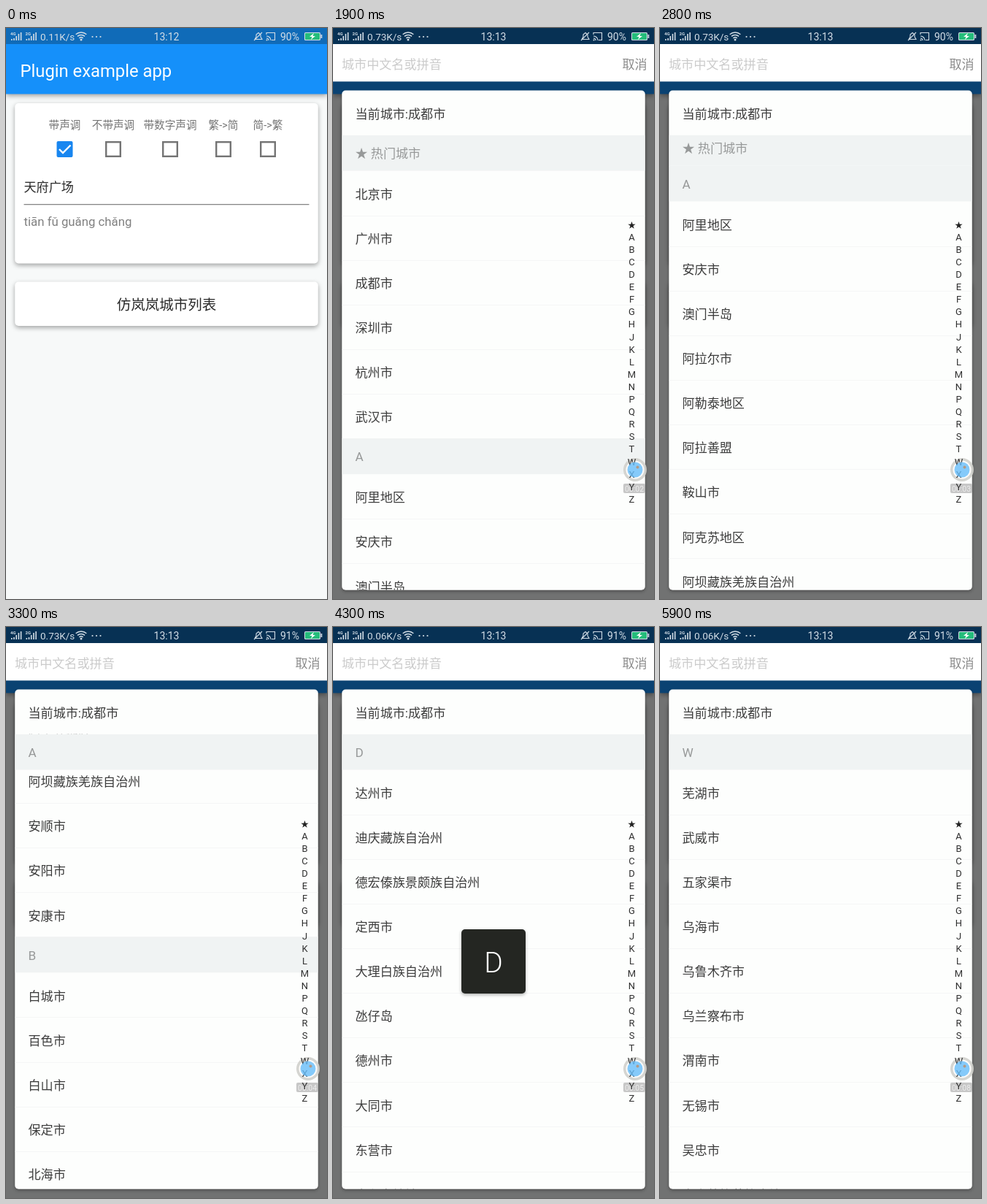
These frames come from a looping animation (440x782 px, 6 s). An HTML page with a canvas:

```html
<!DOCTYPE html>
<html lang="zh-CN">
<head>
<meta charset="utf-8">
<title>城市列表</title>
<style>
html, body { margin: 0; width: 100%; height: 100%; overflow: hidden; }
canvas { display: block; }
</style>
</head>
<body>
<canvas id="stage" width="440" height="782"></canvas>
<script>
const ctx = document.getElementById('stage').getContext('2d');
const LOOP = 6000, STEP = 100, PICKER_OPENS = 1700;
const DP = 440 / 360, ROW = 50 * DP, HEAD = 40 * DP;
const LEFT = 10 * DP, WIDTH = 340 * DP;
const SHEET_TOP = 70 * DP, LIST_TOP = 120 * DP, LIST_END = 782 - LEFT;
const PAPER = '#fdfefd';
const LETTERS = [...'ABCDEFGHJKLMNPQRSTWXYZ'];

const cities = {
  '★ 热门城市': '北京 广州 成都 深圳 杭州 武汉',
  A: '阿里地区 安庆 澳门半岛 阿拉尔 阿勒泰地区 阿拉善盟 鞍山 阿克苏地区 阿坝藏族羌族自治州 安顺 安阳 安康',
  B: '白城 百色 白山 保定 北海 白银 巴音郭楞蒙古自治州 本溪 北京 亳州 滨州 宝鸡 包头 蚌埠 毕节',
  C: '成都 长沙 重庆 长春 常州 沧州 承德 赤峰 潮州 滁州 郴州',
  D: '达州 迪庆藏族自治州 德宏傣族景颇族自治州 定西 大理白族自治州 氹仔岛 德州 大同 东营 大兴安岭地区 大连',
  E: '鄂尔多斯 鄂州 恩施土家族苗族自治州',
  F: '福州 佛山 抚顺 阜阳 防城港 阜新 抚州',
  G: '广州 贵阳 桂林 赣州 广元 贵港 广安 固原 甘南藏族自治州',
  H: '杭州 合肥 海口 哈尔滨 邯郸 惠州 湖州 淮安 黄山 衡阳 鹤岗',
  J: '济南 嘉兴 金华 九江 吉林 江门 荆州 济宁 焦作 锦州 晋城',
  K: '昆明 开封 克拉玛依 喀什地区',
  L: '兰州 洛阳 柳州 拉萨 丽江 临沂 廊坊 泸州 乐山 六安 聊城',
  M: '绵阳 马鞍山 茂名 梅州 牡丹江 眉山',
  N: '南京 宁波 南昌 南宁 南通 南充 南阳 内江 宁德 南平',
  P: '莆田 平顶山 萍乡 攀枝花 濮阳 盘锦 普洱 平凉',
  Q: '齐齐哈尔 清远 钦州 青岛 秦皇岛 潜江 黔西南布依族苗族自治州 黔东南苗族侗族自治州 黔南布依族苗族自治州 曲靖 泉州',
  R: '日照 日喀则 汝州',
  S: '上海 深圳 苏州 沈阳 石家庄 汕头 绍兴 三亚 韶关 十堰 商丘',
  T: '天津 太原 唐山 台州 泰安 通化 铜陵 铁岭 天水 铜川 通辽',
  W: '芜湖 武威 五家渠 乌海 乌鲁木齐 乌兰察布 渭南 无锡 吴忠 文山壮族苗族自治州 武汉',
  X: '西安 厦门 徐州 西宁 襄阳 新乡 邢台 许昌 咸阳 湘潭',
  Y: '扬州 银川 宜昌 烟台 盐城 岳阳 宜宾 玉林 延安 运城',
  Z: '郑州 珠海 中山 镇江 株洲 湛江 淄博 舟山 肇庆 遵义 张家口'
};
const cityName = s => /(自治州|地区|盟|半岛|仔岛)$/.test(s) ? s : s + '市';
let nextTop = 0;
const sections = Object.entries(cities).map(([title, names]) => {
  const section = { title, top: nextTop, names: names.split(' ').map(cityName) };
  nextTop += HEAD + section.names.length * ROW;
  return section;
});
const sectionTop = title => sections.find(s => s.title === title).top;

const modes = [
  ['带声调', 80.5, 'tiān fǔ guǎng chǎng', 0],
  ['不带声调', 147, 'tian fu guang chang', 200],
  ['带数字声调', 225, 'tian1 fu3 guang3 chang3', 500],
  ['繁->简', 298, '天府广场', 900],
  ['简->繁', 359, '天府廣場', 1300]
];

// Last value whose start time has passed; pairs are [start, value].
const at = (t, pairs) => pairs.filter(p => p[0] <= t).pop()[1];

function text(str, x, y, size, color, align = 'left', weight = 400) {
  ctx.font = `${weight} ${size}px Roboto, "Noto Sans CJK SC", "Noto Sans CJK", sans-serif`;
  ctx.textAlign = align;
  ctx.fillStyle = color;
  ctx.fillText(str, x, y + size * 0.365);
}
function rect(x, y, w, h, color) {
  ctx.fillStyle = color;
  ctx.fillRect(x, y, w, h);
}
function box(x, y, w, h, r, color) {
  ctx.beginPath();
  ctx.roundRect(x, y, w, h, r);
  ctx.fillStyle = color;
  ctx.fill();
}
function disc(x, y, r, color) {
  ctx.beginPath();
  ctx.arc(x, y, r, 0, 7);
  ctx.fillStyle = color;
  ctx.fill();
}
function line(points, color, width) {
  ctx.beginPath();
  points.forEach(p => ctx.lineTo(...p));
  ctx.strokeStyle = color;
  ctx.lineWidth = width;
  ctx.stroke();
}
function arc(x, y, r, from, to, color, width) {
  ctx.beginPath();
  ctx.arc(x, y, r, from, to);
  ctx.strokeStyle = color;
  ctx.lineWidth = width;
  ctx.stroke();
}
function shadowed(blur, dy, alpha, draw) {
  ctx.save();
  ctx.shadowColor = `rgba(0,0,0,${alpha})`;
  ctx.shadowBlur = blur;
  ctx.shadowOffsetY = dy;
  draw();
  ctx.restore();
}

function drawStatus(t) {
  const c = '#d3dde6';
  ['4G', '2G'].forEach((label, i) => {
    const x = 6 + i * 20.5;
    text(label, x, 7.5, 6, c, 'left', 700);
    [2, 3, 6, 9, 11].forEach((h, k) => rect(x + 1 + k * 3.2, 17 - h, 1.6, h, c));
  });
  text(at(t, [[0, '0.11K/s'], [900, '0.73K/s'], [4100, '0.06K/s']]), 47, 12, 13.5, c);
  [4, 7.5, 11].forEach(r => arc(103, 17, r, -2.3, -0.84, c, 1.5));
  disc(103, 16, 1.5, c);
  [118.5, 124, 129.5].forEach(x => disc(x, 12, 1.1, c));
  text(at(t, [[0, '13:12'], [900, '13:13']]), 220, 12, 14, c, 'center');
  line([[341, 15.5], [343, 12], [343, 9], [346, 6.5], [349, 9], [349, 12], [351, 15.5], [341, 15.5]], c, 1.1);
  line([[340, 17], [351, 6]], c, 1.1);
  line([[357, 9], [357, 6.5], [368.5, 6.5], [368.5, 16.5], [364, 16.5]], c, 1.1);
  [3, 6].forEach(r => arc(357, 17, r, -1.57, 0, c, 1.1));
  disc(357.5, 16.5, 1, c);
  text(at(t, [[0, '90%'], [3300, '91%']]), 376, 12, 14, c);
  box(409, 6, 22, 11, 1.5, c);
  box(410, 7, 20, 9, 1, '#25bd7b');
  rect(431.5, 9, 1.8, 5, c);
  ctx.beginPath();
  [[422, 7], [416, 12], [419.5, 12], [418, 16], [424, 11], [420.5, 11]].forEach(p => ctx.lineTo(...p));
  ctx.fillStyle = '#fff';
  ctx.fill();
}

function drawCheckbox(x, y, checked) {
  if (checked) {
    box(x - 11, y - 11, 22, 22, 2, '#1886f0');
    line([[x - 7.5, y], [x - 2.5, y + 5], [x + 8, y - 5.5]], '#fff', 2.4);
  } else {
    ctx.strokeStyle = '#747474';
    ctx.lineWidth = 2.4;
    ctx.strokeRect(x - 9.8, y - 9.8, 19.6, 19.6);
  }
}

function drawHome(t) {
  rect(0, 0, 440, 782, '#f7f9f9');
  shadowed(7, 3, 0.4, () => rect(0, 0, 440, 74 * DP, '#1590fa'));
  rect(0, 0, 440, 22, '#106bb8');
  text('Plugin example app', 19.5, 58, 23.8, '#fff');
  shadowed(6, 2.5, 0.35, () => {
    box(LEFT, 103, WIDTH, 219.5, 5, '#fff');
    box(LEFT, 347.5, WIDTH, 60.5, 5, t >= 1500 ? '#e9eaea' : '#fff');
  });
  const mode = modes.filter(m => m[3] <= t).pop();
  for (const m of modes) {
    text(m[0], m[1], 133, 14.6, '#757575', 'center');
    drawCheckbox(m[1], 166, m === mode);
  }
  text('天府广场', 24.5, 218, 17.1, '#2a2a2a');
  rect(24.5, 241, 391, 1.3, '#868686');
  text(mode[2], 24.5, 265, 16.8, '#808080');
  text('仿岚岚城市列表', 220, 379, 19.5, '#2a2a2a', 'center');
}

function drawList(scroll) {
  ctx.save();
  ctx.beginPath();
  ctx.roundRect(LEFT, SHEET_TOP, WIDTH, LIST_END - SHEET_TOP, 5);
  ctx.clip();
  text('当前城市:成都市', 30.5, 118, 17.1, '#3c3c3c');
  ctx.beginPath();
  ctx.rect(LEFT, LIST_TOP, WIDTH, LIST_END - LIST_TOP);
  ctx.clip();
  sections.forEach(section => {
    const top = LIST_TOP + section.top - scroll;
    const end = top + HEAD + section.names.length * ROW;
    if (end < LIST_TOP || top > LIST_END) return;
    section.names.forEach((name, k) => {
      const y = top + HEAD + k * ROW;
      text(name, 30.5, y + 32, 17.1, '#3c3c3c');
      rect(LEFT, Math.round(y + ROW), WIDTH, 1, '#f5f6f6');
    });
    const headTop = Math.max(top, Math.min(LIST_TOP, end - HEAD));
    rect(LEFT, headTop, WIDTH, HEAD, '#f0f3f3');
    text(section.title, 30.5, headTop + 25, 17.1, '#979999');
  });
  ctx.restore();
}

function drawPicker(t) {
  rect(0, 0, 440, 782, 'rgba(0,0,0,.54)');
  rect(0, 22, 440, 60 * DP - 22, '#fff');
  text('城市中文名或拼音', 12, 49.5, 17.1, '#cbcbcb');
  text('取消', 396.5, 49.5, 17.1, '#8c8c8c');

  const u = Math.min(1, Math.max(0, (t - 2210) / 1590));
  let scroll = u * u * (3 - 2 * u) * (sectionTop('B') + 4);
  let letter = '';
  if (t >= 4100) {
    const index = t < 4300 ? 1 + (t - 4100) / 100
      : t < 5100 ? 3 + 11 * (t - 4300) / 800
      : Math.min(18, 14 + (t - 5100) / 150);
    letter = LETTERS[Math.floor(index)];
    scroll = sectionTop(letter);
  }
  shadowed(4, 2, 0.3, () => box(LEFT, SHEET_TOP, WIDTH, LIST_END - SHEET_TOP, 5, PAPER));
  drawList(scroll);
  if (letter && t < 5900) {
    shadowed(4, 2, 0.3, () => box(176, 414, 88, 88, 5, '#242622'));
    text(letter, 220, 459, 39, '#fff', 'center', 300);
  }
}

function drawIndex() {
  text('★', 409.5, 270, 11, '#222', 'center');
  LETTERS.forEach((l, i) => text(l, 409.5, 286 + i * 17.1, 13, '#303030', 'center'));
}

function drawRecorderBack(t) {
  disc(414, 605, 16, 'rgba(208,208,204,.9)');
  disc(414, 605, 12.5, 'rgba(255,255,255,.9)');
  box(398, 624, 30, 13, 2, 'rgba(180,180,180,.75)');
  const seconds = [900, 1700, 2500, 3300, 4100, 4900, 5400, 5900].filter(s => s <= t).length;
  text('00:0' + seconds, 413, 631, 10.5, '#eee', 'center');
}

function drawRecorderCore(t) {
  disc(414, 605, 10.5, 'rgba(104,190,250,.8)');
  if (t % 1300 < 900) disc(417.5, 601.5, 2, '#b39a86');
}

// The index letters lie between the ring and the translucent core.
function frame(now) {
  const t = Math.floor((now % LOOP) / STEP) * STEP;
  const open = t >= PICKER_OPENS, recording = t >= 200;
  drawHome(t);
  if (open) drawPicker(t);
  drawStatus(t);
  if (recording) drawRecorderBack(t);
  if (open) drawIndex();
  if (recording) drawRecorderCore(t);
  requestAnimationFrame(frame);
}
requestAnimationFrame(frame);
</script>
</body>
</html>
```
